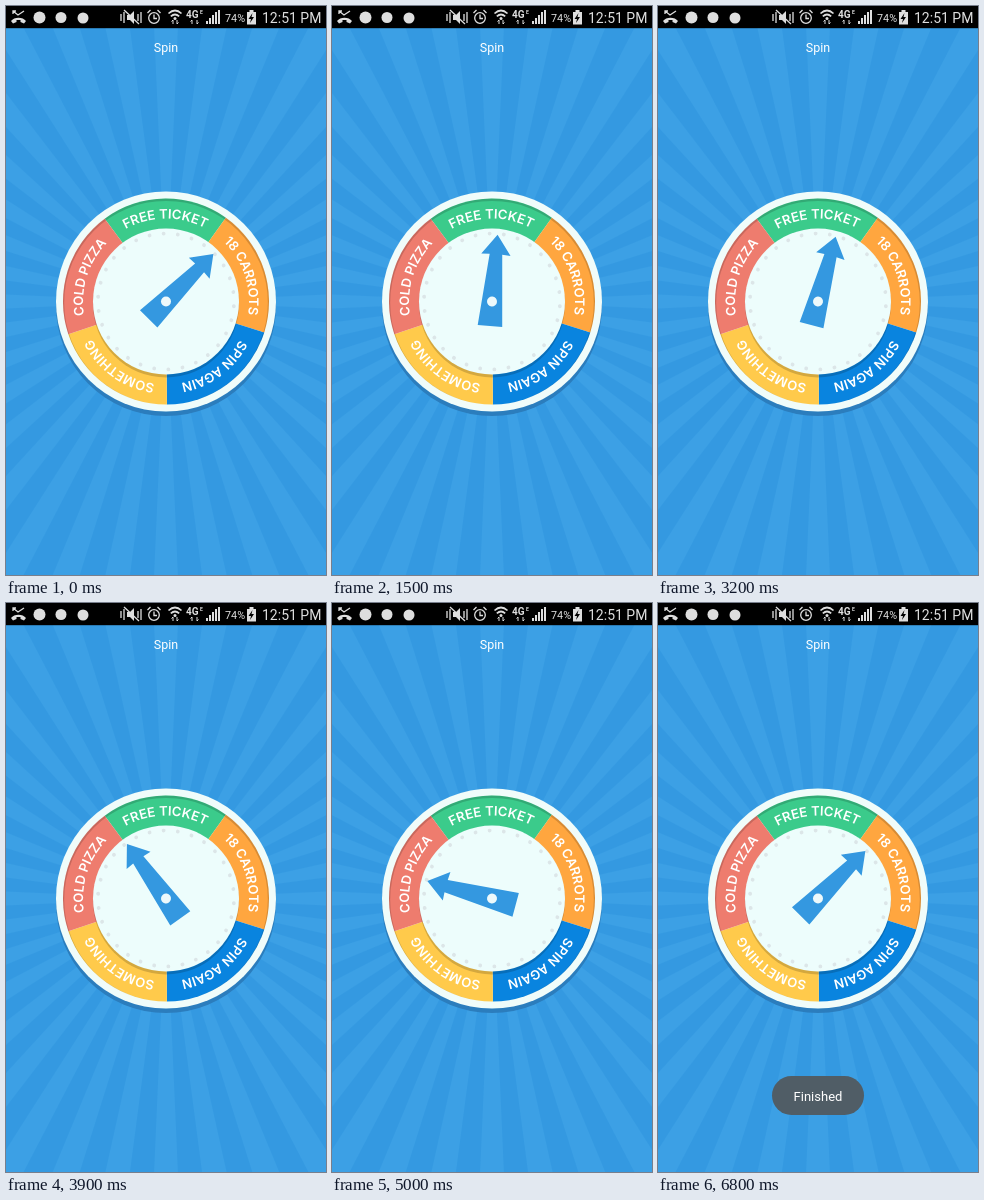
An HTML page for the animation above (8 s loop, 320 by 569 pixels).

```html
<!DOCTYPE html>
<html lang="en">
<head>
<meta charset="utf-8">
<title>Spin</title>
<style>
  html, body { margin: 0; width: 100%; height: 100%; overflow: hidden; background: #3498e0; }
  svg { display: block; width: 100%; height: 100%; }
  text { font-family: Roboto, sans-serif; fill: #fff; }
  .prize { font: 600 13.1px Inter, sans-serif; text-anchor: middle; }
  .label { text-anchor: middle; }
  .icon { fill: none; stroke: #dedede; stroke-width: 1.3; }
  .solid, .bar text { fill: #dedede; }
</style>
</head>
<body>
<svg viewBox="0 0 320 569">
  <defs>
    <path id="arc" d="M-83 0A83 83 0 0 1 83 0"/>
  </defs>
  <rect width="320" height="569" fill="#3499e1"/>
  <path id="rays" fill="#3ca0e5" transform="translate(160 295.5)"/>

  <g class="bar">
    <rect width="320" height="22.200" fill="#000"/>
    <path class="icon" d="M7 5l5 4 6-4M7 8V5h3"/>
    <path class="solid" d="M5 15c3-4.500 12-4.500 15 0l-2 2.500-3.500-1.500v-2h-4v2l-3.500 1.500z"/>
    <circle class="solid" cx="33.500" cy="11.500" r="6"/>
    <circle class="solid" cx="55" cy="11.500" r="5.500"/>
    <circle class="solid" cx="77" cy="12" r="5.500"/>
    <g class="icon">
      <path d="M115 8v7M118 6v11M132 8v7M135 6v11M118 4l15 14"/>
      <path class="solid" d="M121 9h3l4-4v13l-4-4h-3z" stroke="none"/>
      <circle cx="148" cy="12" r="5.300"/>
      <path d="M148 8.500v4h3M141.500 7l3-3M154.500 7l-3-3"/>
      <path d="M162.500 7.500q6.500-6 13 0M164.800 10.300q4.200-3.600 8.400 0" stroke-width="1.700"/>
      <path d="M167 18v-4l-1.500 1.500M171 14v4l1.500-1.500M186 18v-4l-1.500 1.500M191 14v4l1.500-1.500" stroke-width="1"/>
    </g>
    <circle class="solid" cx="169" cy="12.500" r="1.500"/>
    <text x="180" y="11.500" font-size="10" font-weight="700">4G</text>
    <text x="194" y="8" font-size="5" font-weight="700">E</text>
    <path class="solid" d="M200 18v-3h2v3zM203 18v-6h2v6zM206 18V9h2v9zM209 18V6h2v12zM212 18V4h2v14z"/>
    <text x="219" y="15.500" font-size="10.800">74%</text>
    <path class="solid" d="M241 6h2.500V4h4v2h2.500v12.500h-9z"/>
    <path d="M246.500 7l-4 6h2.500l-1 4 4-6h-2.500z"/>
    <text x="256" y="16.500" font-size="14">12:51 PM</text>
  </g>
  <text class="label" x="160" y="45.500" font-size="12.500">Spin</text>

  <g transform="translate(160 295.5)">
    <circle cy="4.500" r="110" fill="#2b7dbd"/>
    <circle r="110" fill="#f0fcfa"/>
    <g id="wheel" transform="rotate(-.5)"></g>
    <path id="rimShade" fill="#000" fill-opacity=".16" fill-rule="evenodd"/>
    <circle cy="3" r="73" fill="#000" fill-opacity=".17"/>
    <circle r="73" fill="#edfdfc"/>
    <g id="dots" fill="#dce6e8"></g>
    <g id="needle">
      <path fill="#3498e0" d="M0-67L14.700-47 6.300-47.500 12.300 24.500H-12.300L-6.300-47.500-14.700-47Z"/>
      <circle r="5" fill="#edf9fb"/>
    </g>
  </g>

  <g id="toast" opacity="0">
    <rect x="114" y="473" width="92" height="39" rx="19.500" fill="#505d66"/>
    <text class="label" x="160" y="497.500" font-size="13">Finished</text>
  </g>
</svg>
<script>
const LOOP = 8000, STEP = 100;
const SPIN_START = 700, SPIN_TIME = 5500, TURNS = 7, REST = 45;
const TOAST_START = 6300, TOAST_FADE = 500;
const RIM = 103;
const PRIZES = [
  ['FREE TICKET', '#3bcb8b'],
  ['18 CARROTS', '#ffa63f'],
  ['SPIN AGAIN', '#0984df'],
  ['SOMETHING', '#ffca4b'],
  ['COLD PIZZA', '#ee7c6e']
];
const $ = id => document.getElementById(id);
const repeat = (n, make) => Array.from({ length: n }, (_, i) => make(i)).join('');

// Angles run clockwise from the top.
const polar = (r, deg) => {
  const a = deg * Math.PI / 180;
  return `${(r * Math.sin(a)).toFixed(2)} ${(-r * Math.cos(a)).toFixed(2)}`;
};
const ring = (r, y) => `M${-r} ${y}a${r} ${r} 0 0 1 ${2 * r} 0a${r} ${r} 0 0 1 ${-2 * r} 0Z`;

$('rays').setAttribute('d', repeat(36, i =>
  `M0 0L${polar(420, i * 10 - 2.5)}L${polar(420, i * 10 + 2.5)}Z`));

$('wheel').innerHTML = PRIZES.map(([name, color], i) =>
  `<g transform="rotate(${i * 72})">
    <path fill="${color}" d="M0 0L${polar(RIM, -36)}A${RIM} ${RIM} 0 0 1 ${polar(RIM, 36)}Z"/>
    <text class="prize"><textPath href="#arc" startOffset="50%">${name}</textPath></text>
  </g>`).join('');

// A slightly smaller, lowered hole leaves a thin crescent along the upper rim.
$('rimShade').setAttribute('d', ring(RIM, 0) + ring(RIM - 1.2, 1.2));

$('dots').innerHTML = repeat(30, i =>
  `<circle cy="-68" r="1.900" transform="rotate(${i * 12 - 2})"/>`);

const progress = (t, start, length) => Math.min(1, Math.max(0, (t - start) / length));
const decelerate = p => 1 - (1 - p) ** 2;

function draw(t) {
  const spin = decelerate(progress(t, SPIN_START, SPIN_TIME));
  $('needle').setAttribute('transform', `rotate(${REST + spin * TURNS * 360})`);
  $('toast').setAttribute('opacity', decelerate(progress(t, TOAST_START, TOAST_FADE)));
}

const start = performance.now();
function tick() {
  const t = (performance.now() - start) % LOOP;
  draw(Math.floor(t / STEP) * STEP);
  requestAnimationFrame(tick);
}
tick();
</script>
</body>
</html>
```
